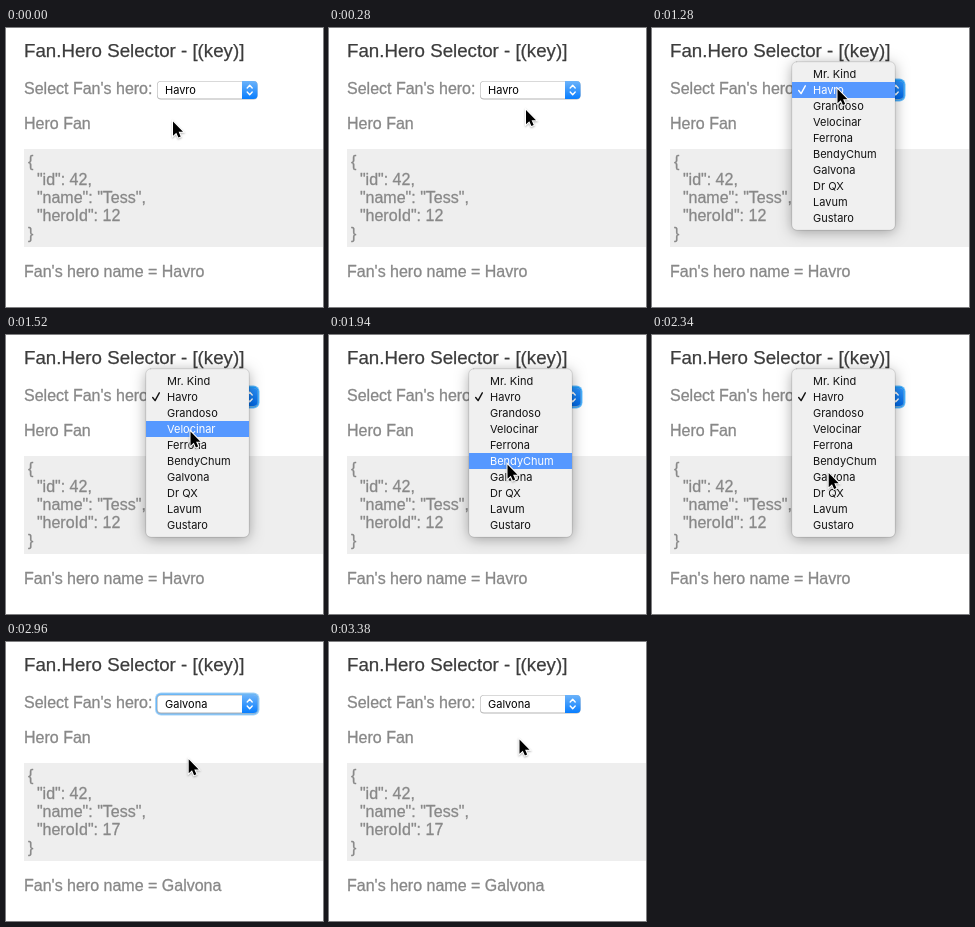
Write an HTML page with a canvas that moves like this. It is 317 px wide and 279 px high and loops after 4.18 s.

```html
<!DOCTYPE html>
<html lang="en">
<head>
<meta charset="utf-8">
<title>Hero selector</title>
<style>
html, body { margin: 0; width: 100%; height: 100%; overflow: hidden; background: #fff; }
canvas { display: block; width: 317px; height: 279px; }
</style>
</head>
<body>
<canvas id="stage"></canvas>
<script>
const W = 317, H = 279, LOOP = 4180;
const PAGE = '"Liberation Sans", Arial, sans-serif';
const UI = '11px Inter, Roboto, sans-serif';
const HEROES = ['Mr. Kind', 'Havro', 'Grandoso', 'Velocinar', 'Ferrona',
  'BendyChum', 'Galvona', 'Dr QX', 'Lavum', 'Gustaro'];
const MENU = { x: 140, y: 34, w: 103, h: 168, top: 38, row: 16 };
const OLD = 1, NEW = 6;

// Event times in ms
const RING_ON = 1040, MENU_ON = 1060, HOVER_ON = 1100, BLINK = 2340,
  BLINK_END = 2400, FADE = 2460, FADE_END = 2680, RING_OFF = 3380;

// Ring and button colours, outside to inside, top to bottom
const IDLE = { ring: ['#a5d3f8', '#6cb6f4'], button: ['#6cb3fa', '#087eff'] };
const PRESSED = { ring: ['#6fc0fd', '#1c9cfd'], button: ['#2a93fd', '#0068e6'] };

// Pointer tip: time, x, y
const PATH = [
  [0, 167, 93.5], [160, 167, 93.5], [280, 197, 82], [600, 197, 82],
  [800, 185.5, 60.5], [1260, 185.5, 60.5], [1520, 184.5, 96.5],
  [1800, 180.5, 121], [1820, 180.5, 121], [1940, 178.5, 129.5],
  [2080, 176.7, 138], [2740, 176.7, 138], [2840, 178, 129], [2860, 178, 129],
  [3100, 190.5, 97.5], [LOOP, 190.5, 97.5]
];

const canvas = document.getElementById('stage');
const ctx = canvas.getContext('2d');
const dpr = window.devicePixelRatio || 1;
canvas.width = W * dpr;
canvas.height = H * dpr;

const same = (a, b) => a[1] === b[1] && a[2] === b[2];

// Speed along one axis at a key; zero next to a pause
function slope(i, axis) {
  const a = PATH[i - 1], b = PATH[i], c = PATH[i + 1];
  if (!a || !c || same(a, b) || same(b, c)) return 0;
  return (c[axis] - a[axis]) / (c[0] - a[0]);
}

function pointer(t) {
  let i = 0;
  while (i < PATH.length - 2 && t >= PATH[i + 1][0]) i++;
  const a = PATH[i], b = PATH[i + 1], d = b[0] - a[0];
  const u = (t - a[0]) / d, v = 1 - u;
  return [1, 2].map(k =>
    v * v * (1 + 2 * u) * a[k] + u * u * (3 - 2 * u) * b[k] +
    d * u * v * (v * slope(i, k) - u * slope(i + 1, k)));
}

// A thin outline gives the slightly heavy look of smoothed type
function text(str, x, y, font, color, weight = 0) {
  ctx.font = font;
  ctx.fillStyle = ctx.strokeStyle = color;
  ctx.fillText(str, x, y);
  if (weight) {
    ctx.lineWidth = weight;
    ctx.strokeText(str, x, y);
  }
}

function box(x, y, w, h, r) {
  ctx.beginPath();
  ctx.roundRect(x, y, w, h, r);
}

function fillBox(color, ...shape) {
  box(...shape);
  ctx.fillStyle = color;
  ctx.fill();
}

function line(points, color, width) {
  ctx.beginPath();
  points.forEach(p => ctx.lineTo(p[0], p[1]));
  ctx.strokeStyle = color;
  ctx.lineWidth = width;
  ctx.lineCap = ctx.lineJoin = 'round';
  ctx.stroke();
}

function drawPage(hero) {
  const body = (str, x, y) => text(str, x, y, '16px ' + PAGE, '#888', .3);
  ctx.fillStyle = '#fff';
  ctx.fillRect(0, 0, W, H);
  text('Fan.Hero Selector - [(key)]', 18, 29, '18.72px ' + PAGE, '#3c3c3c', .25);
  body("Select Fan's hero:", 18, 66);
  body('Hero Fan', 18, 101);
  ctx.fillStyle = '#eee';
  ctx.fillRect(18, 121, W - 18, 98);
  const fan = { id: 42, name: 'Tess', heroId: 11 + hero };
  JSON.stringify(fan, null, 2).split('\n')
    .forEach((s, i) => body(s, 22, 139 + 18 * i));
  body("Fan's hero name = " + HEROES[hero], 18, 249);
}

function drawSelect(hero, ring, look) {
  if (ring) {
    fillBox(look.ring[0], 149, 50.5, 104.5, 23, 6);
    fillBox(look.ring[1], 150, 51.5, 102.5, 21, 5);
  }
  fillBox('#b4b4b4', 151, 53, 100.5, 18.5, 4);
  fillBox('#fff', 151.6, 53.6, 99.3, 17, 3.5);
  const blue = ctx.createLinearGradient(0, 53, 0, 71);
  look.button.forEach((c, i) => blue.addColorStop(i, c));
  fillBox(blue, 236, 53, 15.5, 18, [0, 4, 4, 0]);
  line([[241.2, 60], [243.7, 57.3], [246.2, 60]], '#fff', 1.4);
  line([[241.2, 64], [243.7, 66.7], [246.2, 64]], '#fff', 1.4);
  text(HEROES[hero], 159, 66, UI, '#000');
}

function drawMenu(hover, alpha) {
  const m = MENU;
  ctx.save();
  ctx.globalAlpha = alpha;
  ctx.save();
  ctx.shadowColor = 'rgba(0,0,0,.34)';
  ctx.shadowBlur = 14 * dpr;
  ctx.shadowOffsetY = 2 * dpr;
  fillBox('#f0f0f0', m.x, m.y, m.w, m.h, 5);
  ctx.restore();
  box(m.x - .25, m.y - .25, m.w + .5, m.h + .5, 5);
  ctx.strokeStyle = 'rgba(0,0,0,.22)';
  ctx.lineWidth = .5;
  ctx.stroke();
  HEROES.forEach((name, i) => {
    const y = m.top + m.row * i, on = i === hover;
    const ink = on ? '#fff' : '#111';
    if (on) {
      ctx.fillStyle = '#5698ff';
      ctx.fillRect(m.x, y, m.w, m.row);
    }
    text(name, 161, y + 12, UI, ink);
    if (i === OLD) line([[146.7, y + 8.5], [149.1, y + 11.6], [153.3, y + 3.8]], ink, 1.4);
  });
  ctx.restore();
}

function drawPointer(x, y) {
  const arrow = new Path2D('M0 0V14.2L3.3 11.2L5.4 16L7.7 15L5.6 10.3H10Z');
  ctx.save();
  ctx.translate(x, y);
  ctx.lineJoin = 'miter';
  ctx.lineWidth = 2;
  ctx.strokeStyle = '#fff';
  ctx.shadowColor = 'rgba(0,0,0,.3)';
  ctx.shadowBlur = 2 * dpr;
  ctx.shadowOffsetY = dpr;
  ctx.stroke(arrow);
  ctx.shadowColor = 'transparent';
  ctx.fillStyle = '#000';
  ctx.fill(arrow);
  ctx.restore();
}

function draw(t) {
  const hero = t < FADE_END ? OLD : NEW;
  const [x, y] = pointer(t);
  ctx.setTransform(dpr, 0, 0, dpr, 0, 0);
  drawPage(hero);
  const pressed = t >= RING_ON && t < FADE;
  drawSelect(hero, t >= RING_ON && t < RING_OFF, pressed ? PRESSED : IDLE);
  if (t >= MENU_ON && t < FADE_END) {
    const lit = t >= HOVER_ON && (t < BLINK || t >= BLINK_END);
    const hover = lit ? Math.floor((y - MENU.top) / MENU.row) : -1;
    const alpha = t < FADE ? 1 : Math.max(.06, 1 - (t - FADE) / (2640 - FADE));
    drawMenu(hover, alpha);
  }
  drawPointer(x, y);
}

const start = performance.now();
function tick() {
  const t = (performance.now() - start) % LOOP;
  draw(Math.floor(t / 20) * 20);
  requestAnimationFrame(tick);
}
tick();
</script>
</body>
</html>
```
